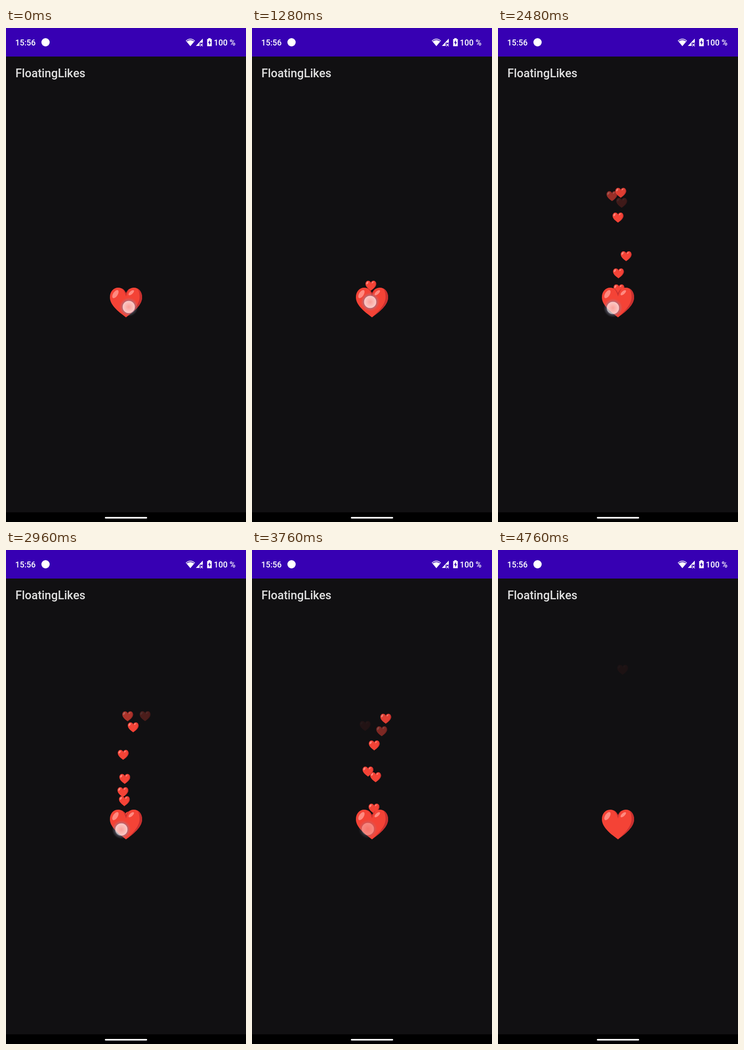
An HTML page that plays this animation: 522x1073 px, repeating every 6.08 s.

```html
<!DOCTYPE html>
<html lang="en">
<head>
<meta charset="utf-8">
<title>FloatingLikes</title>
<style>
  html, body { margin: 0; width: 100%; height: 100%; overflow: hidden; background: #111012; }
  svg { display: block; width: 522px; height: 1073px; }
  text { font-family: Roboto, sans-serif; font-weight: 500; }
</style>
</head>
<body>
<svg viewBox="0 0 522 1073">
  <defs>
    <g id="heart">
      <path fill="#f44336" d="M0 32.5C-8 26-35 9-35-11C-35-24-27-32-17-32C-9-32-3-27 0-20C3-27 9-32 17-32C27-32 35-24 35-11C35 9 8 26 0 32.5Z"/>
      <path fill="#c9302f" d="M24-30.500C31-27.500 35-20 35-11C35 9 8 26 0 32.500C10 23 29 7 29.500-11C29.700-20 28-26 24-30.500Z"/>
      <path fill="#c9302f" d="M-10-30.800C-5-28.800-2-25 0-20C2-25 5-28.500 8-30C4-25 2-20 0-13C-2-20-4-26-10-30.800Z"/>
      <ellipse fill="#ff8a80" rx="5" ry="10" transform="translate(-23 -18) rotate(33)"/>
      <ellipse fill="#ff8a80" rx="7.500" ry="3.200" transform="translate(11.500 -21) rotate(-42)"/>
    </g>
    <radialGradient id="glow">
      <stop offset="0" stop-color="#fff" stop-opacity=".5"/>
      <stop offset=".58" stop-color="#fff" stop-opacity=".7"/>
      <stop offset=".64" stop-color="#f4eef4" stop-opacity=".72"/>
      <stop offset=".67" stop-color="#8a7896" stop-opacity=".6"/>
      <stop offset=".76" stop-color="#8f93a8" stop-opacity=".3"/>
      <stop offset="1" stop-color="#8f93a8" stop-opacity="0"/>
    </radialGradient>
  </defs>

  <rect width="522" height="1073" fill="#111012"/>
  <rect width="522" height="62" fill="#3700b3"/>
  <g fill="#fff">
    <text x="20" y="38" font-size="17.500">15:56</text>
    <circle cx="86" cy="31" r="9"/>
    <path d="M401 39.500L391 27.500Q401 19 411 27.500Z"/>
    <path d="M393 28.300Q401 22.500 409 28.300" fill="none" stroke="#3700b3" stroke-width="1.500"/>
    <path d="M413 39L428 23V32H421V39Z"/>
    <path d="M422.500 34L428 39.500M428 34L422.500 39.500" stroke="#fff" stroke-width="1.600"/>
    <path d="M440 22H445V24H447.500V39.500H437.500V24H440Z"/>
    <path d="M443.500 26L439.500 32.500H442V37.500L445.700 30.800H443.500Z" fill="#3700b3"/>
    <text x="452" y="38" font-size="17.500">100 %</text>
  </g>
  <text x="20.500" y="107" font-size="25.400" fill="#e0e0e0">FloatingLikes</text>

  <g id="likes"></g>
  <use href="#heart" x="261" y="596"/>
  <circle id="touch" r="20.500" fill="url(#glow)"/>

  <rect y="1052" width="522" height="21" fill="#000"/>
  <rect x="215" y="1062" width="92" height="3.500" rx="1.750" fill="#fff"/>
</svg>
<script>
  const LOOP = 6080, STEP = 40, LAST = 4760;
  const START = { x: 261, y: 596 };
  const PRESS = 80, SPOT_FADE = 200, LIFE = 1000;

  // launch time, sideways drift, rise, optional lifetime
  const likes = [
    [1045, -19, 278], [1150, -7, 293], [1330, 24, 220], [1430, 10, 232],
    [1535, 8, 218], [1645, -14, 247], [1730, 7, 279], [1900, 0, 295],
    [2030, 42, 238], [2150, 4, 257], [2270, 20, 270], [2385, -10, 245],
    [2490, -6, 218], [2575, -21, 217], [2660, -17, 245], [2780, -15, 214],
    [2890, 22, 211], [3010, 35, 269], [3135, 7, 248], [3220, 14, 182],
    [3313, -21, 275], [3490, 26, 203], [3610, -29, 216], [3663, 10, 336, 1113]
  ].map(([launch, drift, rise, life = LIFE]) => ({ launch, drift, rise, life }));

  // time, x, y of the finger
  const finger = [[0, 267, 606], [240, 267, 606], [960, 259, 594], [1280, 257, 595],
    [1880, 253, 603], [2480, 250, 608], [3480, 252, 606], [LAST, 252, 606]];

  const clamp = v => Math.max(0, Math.min(1, v));
  const easeInOut = p => (1 - Math.cos(Math.PI * p)) / 2;

  const layer = document.getElementById('likes');
  const touch = document.getElementById('touch');
  for (const like of likes) {
    like.node = document.createElementNS('http://www.w3.org/2000/svg', 'use');
    like.node.setAttribute('href', '#heart');
    layer.append(like.node);
  }

  function fingerAt(t) {
    const i = Math.max(1, finger.findIndex(k => k[0] >= t));
    const [t0, x0, y0] = finger[i - 1], [t1, x1, y1] = finger[i];
    const p = clamp((t - t0) / (t1 - t0));
    return [x0 + (x1 - x0) * p, y0 + (y1 - y0) * p];
  }

  function spotAlpha(t) {
    const taps = [0, ...likes.map(like => like.launch)];
    return Math.max(...taps.map(up => t < up - PRESS ? 0 : clamp(1 - (t - up) / SPOT_FADE)));
  }

  function draw(t) {
    for (const { launch, drift, rise, life, node } of likes) {
      const age = (t - launch) / life;
      const visible = age >= 0 && age < 1;
      node.setAttribute('visibility', visible ? 'visible' : 'hidden');
      if (!visible) continue;
      const p = easeInOut(age);
      node.setAttribute('transform', `translate(${START.x + drift * p} ${START.y - rise * p}) scale(.335)`);
      node.setAttribute('opacity', clamp((1 - age) / .275));
    }
    const [x, y] = fingerAt(t);
    touch.setAttribute('cx', x);
    touch.setAttribute('cy', y);
    touch.setAttribute('opacity', spotAlpha(t));
  }

  const begin = performance.now();
  function tick() {
    const t = (performance.now() - begin) % LOOP;
    draw(Math.min(LAST, Math.floor(t / STEP) * STEP));
    requestAnimationFrame(tick);
  }
  tick();
</script>
</body>
</html>
```
